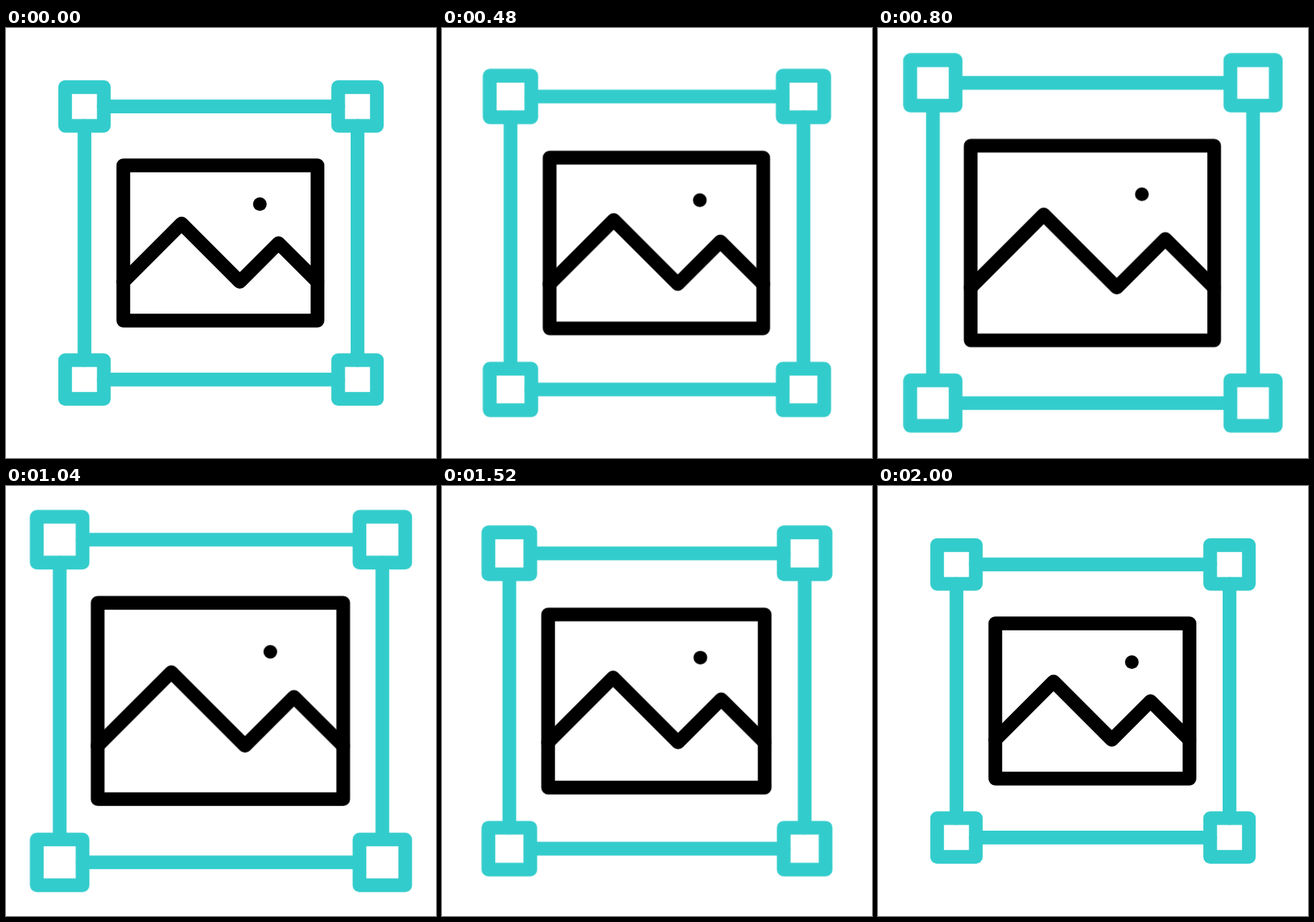
These frames come from a looping animation (640x640 px, 2480 ms). An HTML page:

```html
<!DOCTYPE html>
<html lang="en">
<head>
<meta charset="utf-8">
<title>Resize image</title>
<style>
  html, body { margin: 0; width: 100%; height: 100%; overflow: hidden; background: #fff; }
  svg { display: block; width: 100%; height: 100%; }
  path, rect {
    fill: none;
    stroke-width: 20.4px;
    stroke-linecap: round;
    stroke-linejoin: round;
    vector-effect: non-scaling-stroke;
  }
  g {
    transform-box: view-box;
    animation: grow 2480ms infinite;
  }
  .frame {
    --peak: 1.182;
    stroke: #3cc;
    transform-origin: 320px 320px;
    animation-timing-function: cubic-bezier(.6, 0, .4, 1);
  }
  .picture {
    --peak: 1.265;
    stroke: #000;
    transform-origin: 319px 320px;
    animation-timing-function: cubic-bezier(.68, 0, .32, 1);
  }
  .hills { transform-origin: 319px 344px; }

  /* rest until 40 ms, peak at 1000 ms, back at 2000 ms */
  @keyframes grow {
    0%, 1.613%    { transform: scale(1); }
    40.323%       { transform: scale(var(--peak)); }
    80.645%, 100% { transform: scale(1); }
  }
</style>
</head>
<body>
<svg viewBox="0 0 640 640">
  <g class="frame">
    <path d="M145.6 116.8H494.4M145.6 523.2H494.4M116.8 145.6V494.4M523.2 145.6V494.4"/>
    <rect x="88" y="88" width="57.6" height="57.6"/>
    <rect x="494.4" y="88" width="57.6" height="57.6"/>
    <rect x="88" y="494.4" width="57.6" height="57.6"/>
    <rect x="494.4" y="494.4" width="57.6" height="57.6"/>
  </g>
  <g class="picture">
    <rect x="174.6" y="204.5" width="289" height="231"/>
    <path d="M377.8 262.1h.01"/>
  </g>
  <g class="picture hills">
    <path d="M174.6 377.7L261.3 291L348 377.7L405.6 320.1L463.4 377.7"/>
  </g>
</svg>
</body>
</html>
```
